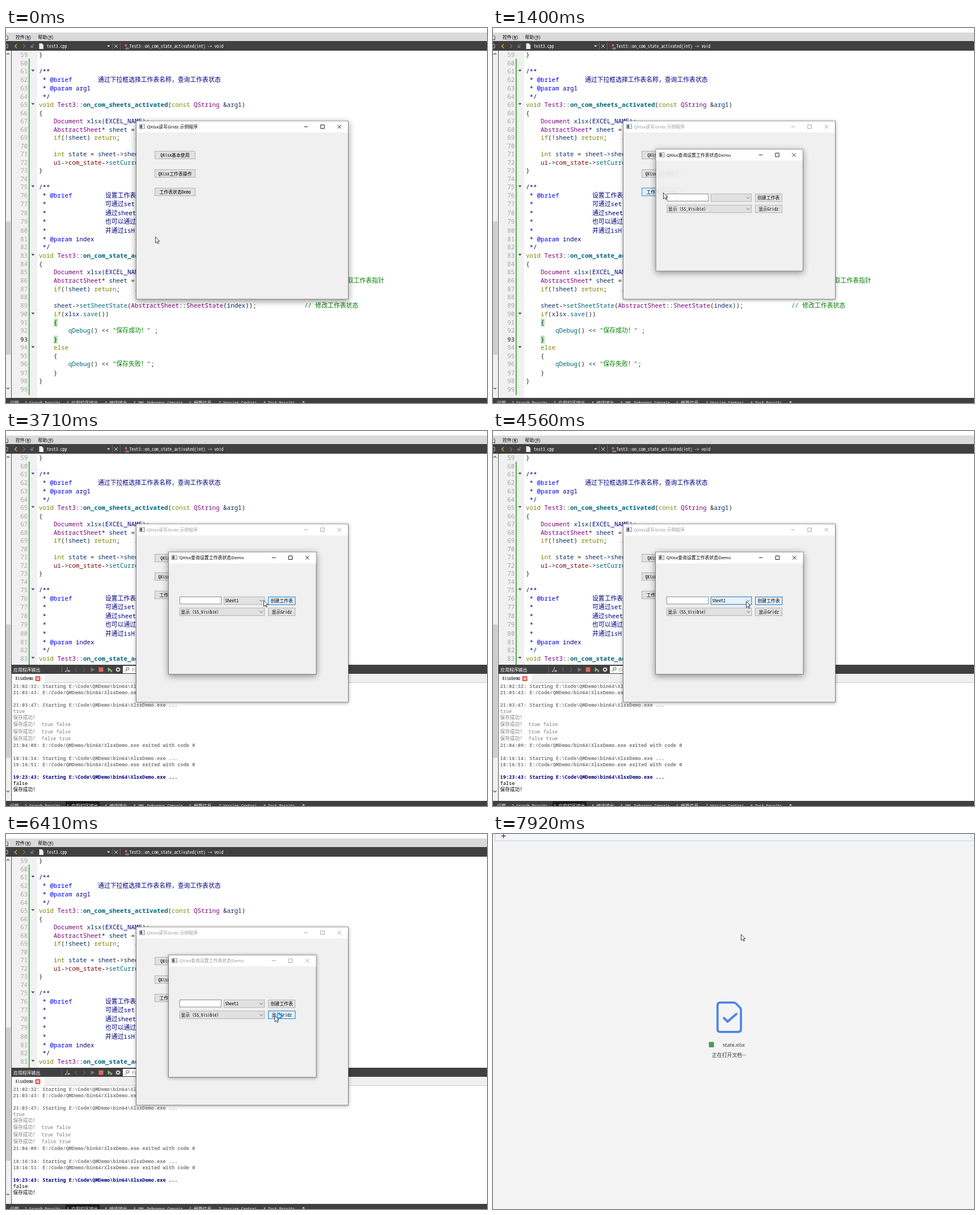
An HTML page for the animation above (7990 ms loop, 848x661 px).

```html
<!DOCTYPE html>
<html lang="zh-CN">
<head>
<meta charset="utf-8">
<title>Worksheet state demo</title>
<style>
  html, body { margin: 0; width: 100%; height: 100%; overflow: hidden; background: #fff; }
  svg { display: block; width: 100vw; height: 100vh; }
  text { white-space: pre; }
  .code { font: 10.83px "Noto Sans Mono", "Noto Sans CJK SC", monospace; }
  .log { font: 8.63px "Noto Sans Mono", "Noto Sans CJK SC", monospace; }
  .small { font: 7.9px "Noto Sans Mono CJK SC", "Noto Sans CJK SC", monospace; }
  .title { font: 7.9px "Noto Sans", "Noto Sans CJK SC", sans-serif; }
  .load { font: 8.9px "Noto Sans", "Noto Sans CJK SC", sans-serif; }
  .bold { font-weight: 700; }
</style>
</head>
<body>
<svg id="stage" viewBox="0 0 848 661" preserveAspectRatio="none"></svg>
<script>
const LOOP = 7990;
const esc = s => s.replace(/[&<>]/g, c => ({ '&': '&amp;', '<': '&lt;', '>': '&gt;' }[c]));
const rect = (x, y, w, h, fill, more = '') =>
  `<rect x="${x}" y="${y}" width="${w}" height="${h}" fill="${fill}" ${more}/>`;
const path = (d, stroke, width = 1, fill = 'none', more = '') =>
  `<path d="${d}" fill="${fill}" stroke="${stroke}" stroke-width="${width}" ${more}/>`;
const markup = (cls, x, y, body, fill = '#000', more = '') =>
  `<text class="${cls}" x="${x}" y="${y}" fill="${fill}" ${more}>${body}</text>`;
const text = (cls, x, y, s, fill, more) => markup(cls, x, y, esc(s), fill, more);
const group = (id, body, more = '') => `<g id="${id}" ${more}>${body}</g>`;

// ---- editor ----
const source = String.raw`}

/**
 * @brief       通过下拉框选择工作表名称，查询工作表状态
 * @param arg1
 */
void Test3::on_com_sheets_activated(const QString &arg1)
{
    Document xlsx(EXCEL_NAME);
    AbstractSheet* sheet = xlsx.
    if(!sheet) return;    //

    int state = sheet->sheet
    ui->com_state->setCurren
}

/**
 * @brief         设置工作表
 *                可通过set
 *                通过sheet
 *                也可以通过
 *                并通过isH
 * @param index
 */
void Test3::on_com_state_activated(
{
    Document xlsx(EXCEL_NAME);
    AbstractSheet* sheet = ${'xlsx.'.padEnd(52)}// 获取工作表指针
    if(!sheet) return;    //

    sheet->setSheetState(AbstractSheet::SheetState(index));             // 修改工作表状态
    if(xlsx.save())
    {
        qDebug() << "保存成功！" ;
    }
    else
    {
        qDebug() << "保存失败！";
    }
}
`.split('\n');

const tokenColors = [
  [/^(\/\/|")/, '#008000'],
  [/^@/, '#0000ff'],
  [/^(void|const|if|return|int|else)$/, '#808000'],
  [/^(Document|AbstractSheet|Test3|QString|SheetState)$/, '#800080'],
  [/^(on_com_|set|save|qDebug)/, '#00677c'],
  [/^(ui|com_state)$/, '#800000'],
  [/^EXCEL/, '#000080'],
  [/^(xlsx|sheet|state|arg1|index)$/, '#092e64'],
];

function highlight(line) {
  const isDoc = /^(\/\*| \*)/.test(line);
  return line.replace(/\/\/.*|"[^"]*"|@\w+|\w+|[^]/g, token => {
    const rule = tokenColors.find(([re]) => re.test(token));
    const color = isDoc ? (token[0] === '@' ? '#0000ff' : '#000080') : rule ? rule[1] : '#222';
    const bold = /^on_com_/.test(token) ? ' class="bold"' : '';
    return `<tspan fill="${color}"${bold}>${esc(token)}</tspan>`;
  });
}

function editor() {
  let out = rect(10, 40, 45, 612, '#f1f1f1') + rect(40, 54, 1.5, 593, '#18a018');
  let y = 47.4;
  source.forEach((line, i) => {
    const number = 59 + i;
    if (number === 91 || number === 93) out += rect(84, y - 7, 7, 14, '#b4e6b4');
    out += text(number === 93 ? 'code bold' : 'code', 38.3, y + 3.7, String(number),
      number === 93 ? '#666' : '#a5a5a5', 'text-anchor="end"');
    out += markup('code', 58, y + 3.7, highlight(line));
    if ([61, 65, 75, 83, 90, 94].includes(number))
      out += path(`M44.5 ${y - 3}h6l-3 3.2z`, 'none', 0, '#444');
    y += 14.52 + (/[\u4e00-\u9fff]/.test(line) ? 0.9 : 0);
  });
  return out;
}

const scrollbar = () => rect(0, 40, 9, 612, '#f0f0f0') + rect(0, 341, 8, 235, '#cdcdcd') +
  path('M1 47l2.5-2.5l2.5 2.5M1 634l2.5 2.5l2.5-2.5', '#555', 1.2) + rect(9, 40, 1, 612, '#555');

const topBars = () => rect(0, 8, 848, 16, '#dadada') + rect(0, 23, 848, 17, '#404040') +
  text('small', -3, 19, 'T)') + text('small', 17, 19, '控件(W)') + text('small', 56.5, 19, '帮助(H)') +
  path('M0 20.5h4M37 20.5h4M75 20.5h4', '#000', 0.6) +
  path('M19 28.5l-3.5 3.5l3.5 3.5', '#e3a32b', 1.4) + path('M30 28.5l3.5 3.5l-3.5 3.5', '#777', 1.2) +
  path('M0 29h3v6h-3', '#ddd', 0.8) +
  rect(43, 31, 5, 4, '#707070') + path('M46 31v-2h3v2', '#707070') +
  path('M58.5 27h4.5l3 3v7h-7.5z', 'none', 0, '#eee') + text('small', 72, 35, 'test3.cpp', '#fff') +
  path('M178 30.5h5.5l-2.7 3z', 'none', 0, '#ddd') + rect(187, 25, 1, 13, '#666') + rect(201, 25, 1, 13, '#666') +
  path('M191 29l6 6m0-6l-6 6', '#ddd') +
  path('M211 28l3 2l-2 3l-3-2z', 'none', 0, '#e05a78') + path('M211 35h5v2h-5z', '#ccc', 0.7) +
  text('small', 217.5, 35, 'Test3::on_com_state_activated(int) -> void', '#fff');

const bottomBar = () => rect(0, 652, 848, 9, '#404040') + rect(105, 653, 60, 8, '#1c1c1c', 'id="activeTab"') +
  [[7, '问题'], [33, '2 Search Results'], [107, '3 应用程序输出'], [174, '4 编译输出'],
   [225, '5 QML Debugger Console'], [323, '6 概要信息'], [375, '7 Version Control'], [454, '8 Test Results']]
    .map(([x, s]) => text('small', x, 663.5, s, '#eee')).join('') +
  path('M522 660l2.5-2.5l2.5 2.5z', 'none', 0, '#eee');

// ---- output panel ----
function outputPanel() {
  const start = time => time + String.raw`: Starting E:\Code\QMDemo\bin64\XlsxDemo.exe ...`;
  const exit = time => time + ': E:/Code/QMDemo/bin64/XlsxDemo.exe exited with code 0';
  const rows = [
    [450, start('21:02:32')], [461, exit('21:03:43')], [483, start('21:03:47')], [494, 'true'],
    [505, '保存成功!'], [517, '保存成功!  true false'], [530, '保存成功!  true false'],
    [542, '保存成功!  false true'], [554, exit('21:04:09')], [577, start('18:16:14')],
    [588, exit('18:16:51')], [610, start('19:23:43')], [621, 'false'], [632, '保存成功!'],
  ];
  const icons = path('M108 416v4l-4 4h3m2-2h3v2h-3z', '#ccc') +
    path('M125 417l-3.5 3.5l3.5 3.5M136 417l3.5 3.5l-3.5 3.5', '#777') +
    path('M149.5 416.5l7 4l-7 4z', 'none', 0, '#777') + rect(163.5, 416.5, 8, 8, '#e0685c') +
    path('M179.5 416.5l6 4l-6 4z', 'none', 0, '#85b56b') + path('M184 421l3 4m0-4l-3 4', '#ccc') +
    `<circle cx="197.5" cy="420.5" r="2.6" fill="none" stroke="#ddd" stroke-width="1.6"/>` +
    `<circle cx="197.5" cy="420.5" r="3.8" fill="none" stroke="#ddd" stroke-dasharray="1.5"/>`;
  return rect(10, 412, 838, 249, '#fff') + rect(10, 412, 838, 16, '#404040') +
    text('small', 13, 423.5, '应用程序输出', '#fff') + rect(98, 414, 1, 12, '#666') + icons +
    rect(206, 414, 100, 13, '#fff') +
    `<circle cx="214.5" cy="419" r="2.6" fill="none" stroke="#555"/>` + path('M212.5 421l-3 3', '#555') +
    text('small', 222, 423.5, 'Filter', '#888') +
    rect(10, 428, 838, 16, '#f0f0f0') + rect(10, 443, 838, 1, '#d5c8c8') + rect(11, 429, 57, 15, '#fff') +
    text('small', 16.5, 439, 'XlsxDemo') + rect(51.5, 432, 9, 9, '#df6152', 'rx="1.5"') +
    path('M54 434.5l4 4m0-4l-4 4', '#fff', 1.1) +
    rows.map(([y, s]) => {
      const process = /^\d/.test(s);
      const color = y < 600 ? '#808080' : process ? '#00008b' : '#000';
      return text(process ? 'log bold' : 'log', 12.5, y + 3, s, color);
    }).join('');
}

// ---- windows ----
const appIcon = (x, y) => rect(x, y, 9, 7.5, '#fff', 'stroke="#777" stroke-width=".8"') +
  rect(x + 1, y + 1, 3.5, 5.5, '#3f6487') + rect(x + 5, y + 2, 3, 4, '#ddd');

function windowFrame(id, x, y, w, h, title, body) {
  const right = x + w, mid = y + 10;
  const controls = path(`M${right - 78} ${mid}h6.5M${right - 48.7} ${mid - 3.2}h6.4v6.4h-6.4z` +
    `M${right - 19} ${mid - 3.2}l6.4 6.4m0-6.4l-6.4 6.4`, 'currentColor', 0.9);
  return group(id,
    rect(x, y, w, h, '#f0f0f0', `id="${id}Frame" stroke="#777" stroke-width=".9"`) +
    rect(x + 0.5, y + 0.5, w - 1, 19.5, '#fff') + appIcon(x + 6, y + 6) +
    group(id + 'Chrome', text('title', x + 19, y + 12.8, title, 'currentColor') + controls) + body);
}

function control(id, x, y, w, s, isCombo, label = '') {
  const middle = x + w / 2;
  return rect(x, y, w, 13.5, '#e1e1e1', 'stroke="#adadad" stroke-width=".9"') +
    rect(x, y, w, 13.5, '#e5f1fb', `id="${id}" stroke="#0078d7" stroke-width=".9" opacity="0"`) +
    (isCombo
      ? text('small', x + 2, y + 9.7, s, '#000', label) +
        path(`M${x + w - 8.5} ${y + 5.5}l2.8 2.8l2.8-2.8`, '#555', 0.9)
      : text('small', middle, y + 9.9, s, '#000', 'text-anchor="middle"'));
}

const mainWindow = () => windowFrame('main', 229.5, 164, 374, 314, 'QXlsx读写Gridz 示例程序',
  control('basic', 262.5, 217.2, 71, 'QXlsx基本使用') +
  control('sheetOps', 262.5, 249.7, 71, 'QXlsx工作表操作') +
  control('stateDemo', 262.5, 282.2, 71, '工作表状态Demo'));

const dialog = () => windowFrame('dialog', 286.5, 213.3, 260.5, 215.5, 'QXlsx查询设置工作表状态Demo',
  rect(306.3, 292.3, 73.3, 12.7, '#fff', 'stroke="#7a7a7a" stroke-width=".9"') +
  control('sheets', 384.3, 292.3, 71.5, 'Sheet1', true, 'id="sheetName"') +
  control('create', 462.5, 292.5, 47.3, '创建工作表') +
  control('state', 306.3, 312, 149.5, '显示（SS_Visible）', true) +
  control('show', 462.5, 312, 47.3, '显示Gridz'));

// ---- loading screen ----
const loading = () => rect(0, 0, 848, 661, '#f4f4f4') +
  rect(3, 0, 845, 12, '#f3f5f9') + path('M3.5 0v12h844.5M842.5 0v9', '#c6cfdd') +
  path('M14.5 3.5h8M18.5 0v7.5', '#444', 1.3) +
  group('doc', path('M400 296H424Q427 296 429 298L436 305Q438 307 438 310V345Q438 350 433 350H400' +
    'Q395 350 395 345V301Q395 296 400 296Z', '#4e86e4', 4) +
    path('M407 324.5l6.5 6.5l16-14', '#4e86e4', 4.4, 'none', 'stroke-linecap="round" stroke-linejoin="round"')) +
  rect(380.5, 366.5, 9, 9.5, '#4f9a55') +
  text('load', 405, 374.6, 'state.xlsx', '#333') + text('load', 386, 392.5, '正在打开文档···', '#333');

const cursor = () => group('cursor',
  path('M.5 .5V11.3L3 9L4.8 12.6L6.4 11.8L4.7 8.2H7.8Z', '#111', 0.8, '#fff') +
  group('busy', `<circle cx="8.5" cy="1.3" r="3.7" fill="#fff" stroke="#2f93e0" stroke-width="2.6"/>` +
    `<circle id="spin" cx="8.5" cy="1.3" r="3.7" fill="none" stroke="#6dbcf3" stroke-width="2.6" stroke-dasharray="7 17"/>`));

document.getElementById('stage').innerHTML = rect(0, 0, 848, 661, '#fff') + editor() +
  group('panel', outputPanel()) + scrollbar() + topBars() + bottomBar() + mainWindow() + dialog() +
  group('loading', loading()) + cursor();

// ---- motion ----
const $ = id => document.getElementById(id);
const ramp = (t, a, b) => Math.min(1, Math.max(0, (t - a) / (b - a)));
const smooth = p => p * p * (3 - 2 * p);
const show = (id, on) => { $(id).style.display = on ? '' : 'none'; };
const fade = (id, t, from, to, length = 140) => {
  $(id).style.opacity = ramp(t, from, from + length) - ramp(t, to, to + length);
};

const route = [
  [270, 263, 367.5], [1010, 300, 290], [1710, 300, 290], [2270, 478, 299], [3450, 478, 298],
  [3710, 454, 298], [4230, 440, 303], [4370, 440, 303], [4560, 446, 300], [4710, 446, 300],
  [5460, 474, 319.5], [7170, 473, 320], [7920, 437, 176.3],
];

function cursorAt(t) {
  const next = route.findIndex(([time]) => time > t);
  if (next === 0) return route[0].slice(1);
  if (next < 0) return route.at(-1).slice(1);
  const [t0, x0, y0] = route[next - 1], [t1, x1, y1] = route[next];
  const p = smooth(ramp(t, t0, t1));
  return [x0 + (x1 - x0) * p, y0 + (y1 - y0) * p];
}

function setActive(id, active) {
  $(id + 'Chrome').style.color = active ? '#000' : '#999';
  $(id + 'Frame').style.filter = active
    ? 'drop-shadow(0 3px 6px rgba(0,0,0,.42))' : 'drop-shadow(0 1px 3px rgba(0,0,0,.35))';
}

function draw(t) {
  const open = 1 - (1 - ramp(t, 1180, 1470)) ** 2;
  const size = 0.92 + 0.08 * open;
  show('dialog', open > 0);
  $('dialog').style.opacity = open;
  $('dialog').setAttribute('transform', `translate(416.7 321) scale(${size}) translate(-416.7 -321)`);
  setActive('main', t < 1150);
  setActive('dialog', t < 5530);

  fade('stateDemo', t, 850, 1370);
  fade('create', t, 2130, 5250);
  fade('sheets', t, 3720, 4850);
  fade('show', t, 5250, LOOP);
  $('sheetName').style.opacity = ramp(t, 2350, 2530);

  show('panel', t >= 2670);
  show('activeTab', t >= 2670);
  show('loading', t >= 6540);
  const pulse = 0.98 + 0.02 * Math.cos((t - 6910) / 2020 * 2 * Math.PI);
  $('doc').setAttribute('transform', `translate(416.5 323) scale(${pulse}) translate(-416.5 -323)`);

  $('cursor').setAttribute('transform', `translate(${cursorAt(t)})`);
  show('busy', t >= 5850 && t < 7170);
  $('spin').setAttribute('transform', `rotate(${t * 0.36} 8.5 1.3)`);
}

function tick() {
  draw(performance.now() % LOOP);
  requestAnimationFrame(tick);
}
tick();
</script>
</body>
</html>
```
